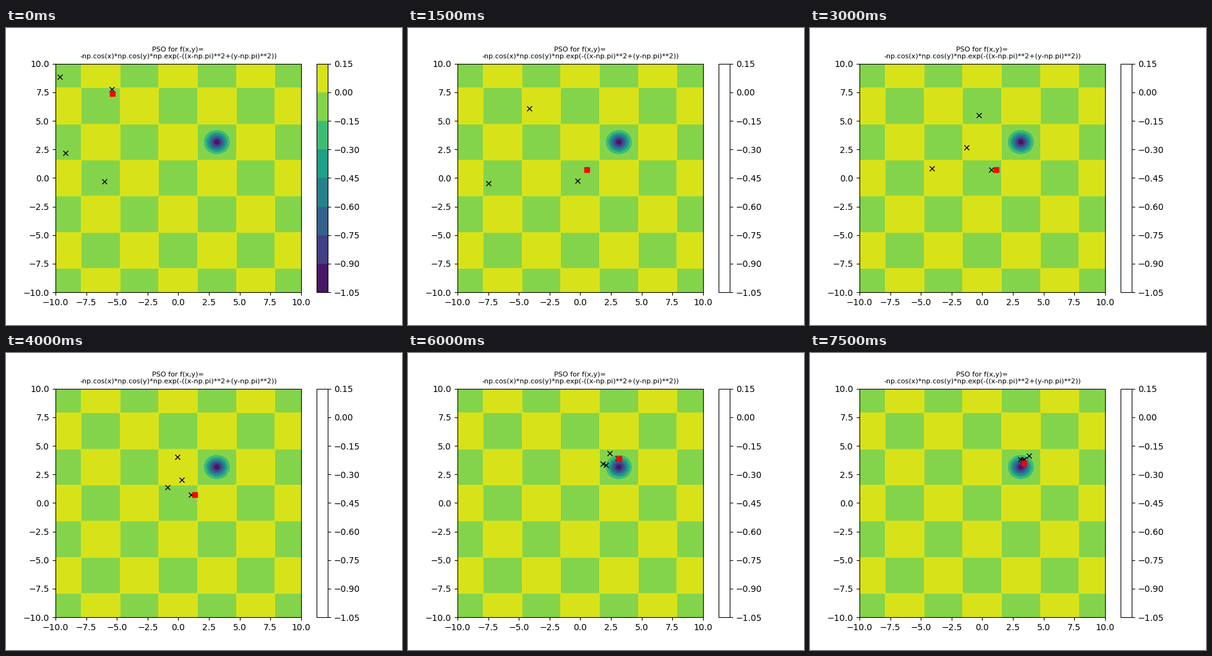
Animation of 640x480 px, one loop 8 s. Source, as a matplotlib script:

```python
import numpy as np
import matplotlib.pyplot as plt
from matplotlib.animation import FuncAnimation

FRAMES, INTERVAL = 16, 500
INERTIA = 0.72

# Turning points of each trailing particle, reached at KEY_STEPS
KEY_STEPS = np.array([0, 1, 3, 6, 10, 12, 15])
PATHS = np.array([
    [(-9.65, 8.82), (1.85, 8.19), (-2.34, 10.17), (-.27, 5.49),
     (.28, 3.49), (1.82, 3.43), (3.1, 3.81)],
    [(-5.41, 7.77), (3.61, 6.47), (-.22, -.25), (.74, .75),
     (1.64, 1.37), (3.03, 3.92), (3.81, 4.11)],
    [(-6.03, -.33), (.89, 3.66), (-4.15, 6.08), (-1.28, 2.67),
     (1.54, 2.59), (2.4, 4.35), (3.41, 3.81)],
    [(-9.17, 2.19), (-9.07, -3.71), (-7.5, -.47), (-4.1, .83),
     (1.69, 2.08), (2.12, 3.3), (3.31, 3.78)],
])
SLOPES = np.gradient(PATHS, KEY_STEPS, axis=1)

# Each new leader: first step, position, velocity
LEADERS = [
    (0, (-5.36, 7.38), (0, 0)),
    (1, (-.37, .72), (.53, 0)),
    (9, (1.43, 3.28), (.77, .26)),
    (15, (3.43, 3.51), (0, 0)),
]


def swarm_at(step):
    """Cubic Hermite position of every trailing particle."""
    i = min(np.searchsorted(KEY_STEPS, step, side="right"), len(KEY_STEPS) - 1) - 1
    span = KEY_STEPS[i + 1] - KEY_STEPS[i]
    t = (step - KEY_STEPS[i]) / span
    ease = t * t * (3 - 2 * t)
    return (PATHS[:, i] * (1 - ease) + PATHS[:, i + 1] * ease
            + span * t * (1 - t) * (SLOPES[:, i] * (1 - t) - SLOPES[:, i + 1] * t))


def leader_at(step):
    """The current leader coasts on its decaying velocity."""
    first, start, velocity = [entry for entry in LEADERS if entry[0] <= step][-1]
    travel = (1 - INERTIA ** (step - first)) / (1 - INERTIA)
    return np.array(start) + np.array(velocity) * travel


fig, ax = plt.subplots(figsize=(6.4, 4.8), dpi=100)

axis = np.linspace(-10, 10, 200)
x, y = np.meshgrid(axis, axis)
z = -np.cos(x) * np.cos(y) * np.exp(-((x - np.pi) ** 2 + (y - np.pi) ** 2))
surface = ax.contourf(x, y, z, levels=np.linspace(-1.05, 0.15, 9), cmap="viridis")
bar = fig.colorbar(surface, ax=ax)
ax.set(xlim=(-10, 10), ylim=(-10, 10))
ax.set_title("PSO for f(x,y)=\n"
             "-np.cos(x)*np.cos(y)*np.exp(-((x-np.pi)**2+(y-np.pi)**2))",
             fontsize=8)

swarm, = ax.plot([], [], "kx")
best, = ax.plot([], [], "rs")


def update(step):
    swarm.set_data(*swarm_at(step).T)
    best.set_data(*leader_at(step).reshape(2, 1))
    # the colour bar keeps its fill for the first step only
    bar.solids.set_visible(step == 0)
    return swarm, best, bar.solids


anim = FuncAnimation(fig, update, frames=FRAMES, interval=INTERVAL,
                     repeat=True, repeat_delay=0, blit=False)
plt.show()
```
